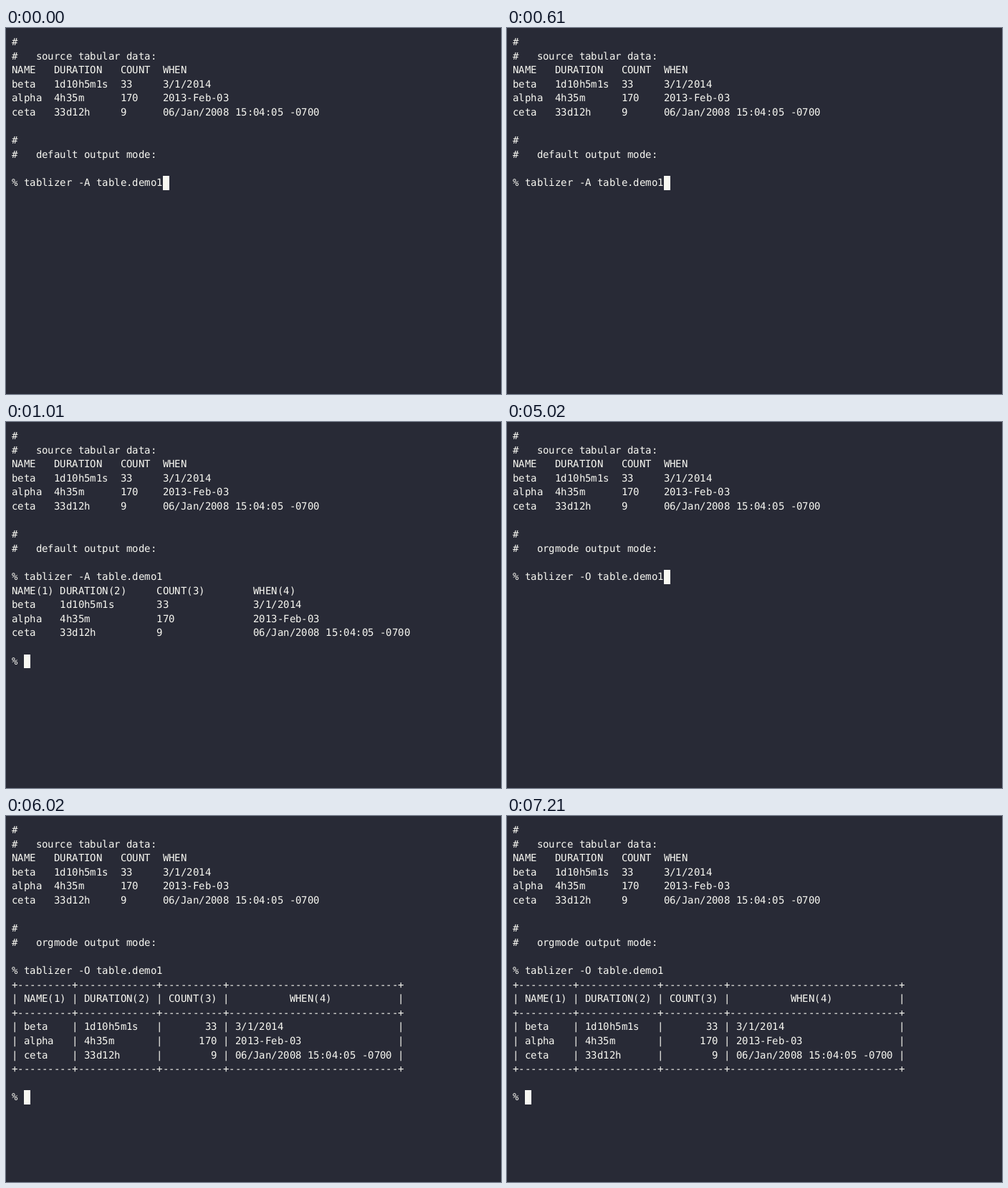
Recreate the animation shown at these times as an HTML page with a canvas. Size 691 by 510 pixels, loop 8000 ms.

```html
<!DOCTYPE html>
<html lang="en">
<head>
<meta charset="utf-8">
<title>Terminal</title>
<style>
  html, body { margin: 0; width: 100%; height: 100%; overflow: hidden; background: #282a36; }
  canvas { display: block; }
</style>
</head>
<body>
<canvas id="screen" width="691" height="510"></canvas>
<script>
const ctx = document.getElementById('screen').getContext('2d');
const BG = '#282a36', FG = '#f8f8f2';
const SIZE = 14, COL = 8.4285, ROW = 19.6, TOP = 10;
const LOOP = 8000;

const colX = c => COL * (c + 1);
const rowY = r => TOP + Math.round(ROW * r);

const heads = ['NAME', 'DURATION', 'COUNT', 'WHEN'];
const data = [
  ['beta', '1d10h5m1s', '33', '3/1/2014'],
  ['alpha', '4h35m', '170', '2013-Feb-03'],
  ['ceta', '33d12h', '9', '06/Jan/2008 15:04:05 -0700']
];
const numbered = heads.map((h, i) => `${h}(${i + 1})`);

const columns = (rows, widths) =>
  rows.map(row => row.map((s, i) => s.padEnd(widths[i])).join(''));

function center(s, w) {
  const left = Math.floor((w - s.length) / 2);
  return (' '.repeat(left) + s).padEnd(w);
}

function orgTable(widths) {
  const rule = '+' + widths.map(w => '-'.repeat(w + 2)).join('+') + '+';
  const line = cells => '| ' + cells.join(' | ') + ' |';
  const body = data.map(row => line(row.map((s, i) =>
    i === 2 ? s.padStart(widths[i]) : s.padEnd(widths[i]))));
  return [rule, line(numbered.map((h, i) => center(h, widths[i]))), rule, ...body, rule];
}

const prompt = (mode, flag) => [
  '#', '#   source tabular data:',
  ...columns([heads, ...data], [7, 11, 7, 0]),
  '', '#', `#   ${mode} output mode:`, '',
  `% tablizer -${flag} table.demo1`
];

const plain = prompt('default', 'A');
const org = prompt('orgmode', 'O');
const scenes = [
  { at: 0, lines: plain },
  { at: 1010, lines: [...plain, ...columns([numbered, ...data], [8, 16, 16, 0]), '', '% '] },
  { at: 5020, lines: org },
  { at: 6020, lines: [...org, ...orgTable([7, 11, 8, 26]), '', '% '] }
];

// Glyphs start on whole pixels, rounded down; the cursor block rounds to nearest.
function draw({ lines }) {
  ctx.fillStyle = BG;
  ctx.fillRect(0, 0, 691, 510);
  ctx.fillStyle = FG;
  ctx.font = `${SIZE}px "DejaVu Sans Mono", monospace`;
  ctx.textRendering = 'geometricPrecision'; // unhinted outlines
  ctx.textBaseline = 'alphabetic';
  lines.forEach((line, r) => {
    [...line].forEach((ch, c) => {
      if (ch !== ' ') ctx.fillText(ch, Math.floor(colX(c)), rowY(r) + SIZE);
    });
  });
  const r = lines.length - 1, c = lines[r].length;
  const left = Math.round(colX(c)), right = Math.round(colX(c + 1));
  ctx.fillRect(left, rowY(r), right - left, rowY(r + 1) - rowY(r));
}

const start = performance.now();
let shown = null;

function tick() {
  const t = Math.max(0, performance.now() - start) % LOOP;
  const scene = scenes.filter(s => s.at <= t).pop();
  if (scene !== shown) draw(shown = scene);
  requestAnimationFrame(tick);
}
tick();
</script>
</body>
</html>
```
